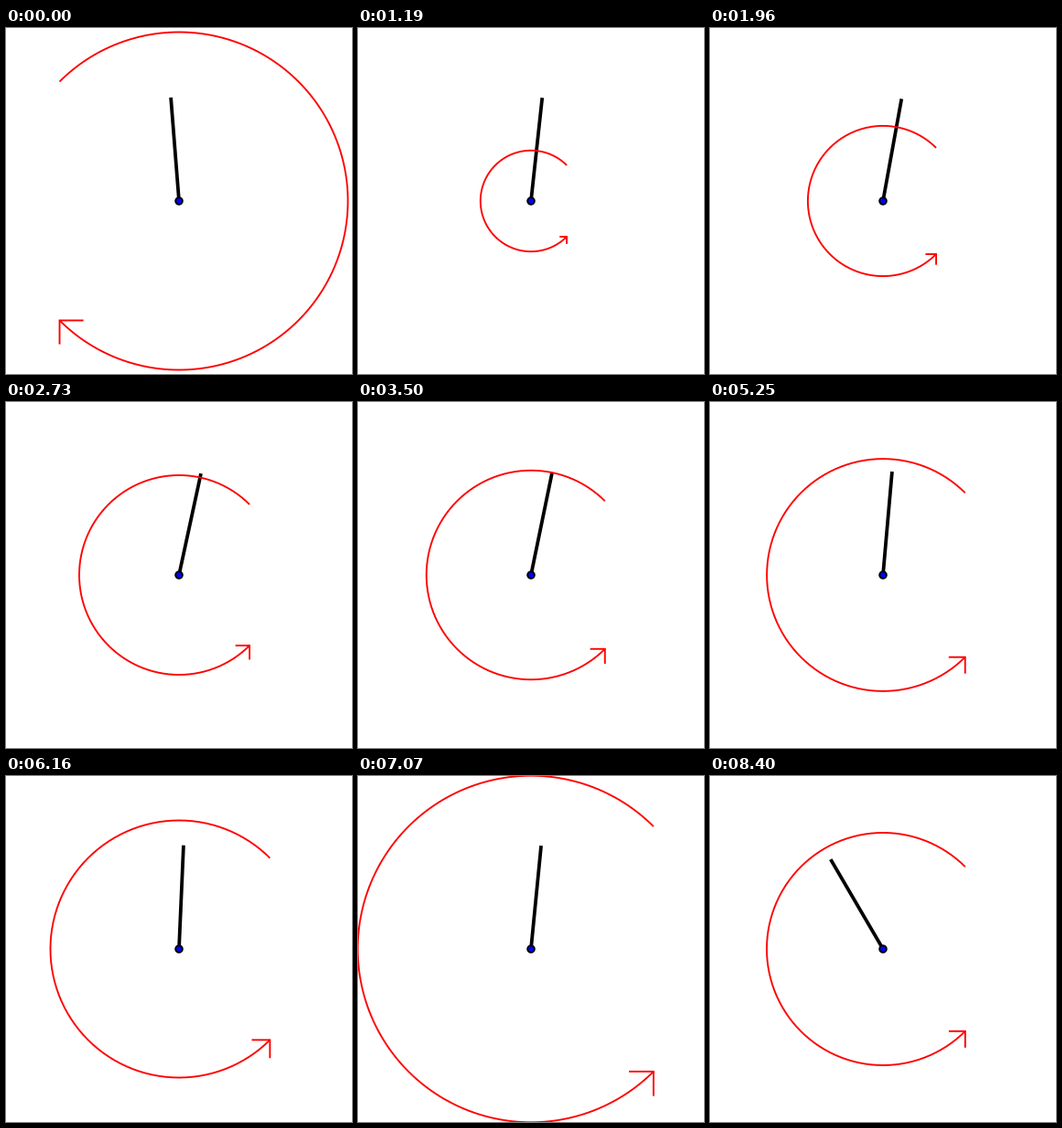
A matplotlib script for the animation above (8.47 s loop, 378 px wide and 378 px high).

```python
import numpy as np
import matplotlib.pyplot as plt
from matplotlib.animation import FuncAnimation
from matplotlib.patches import Circle

SIZE, DPI = 378, 100
MID = SIZE / 2
ROD = 0.3 * SIZE
FRAMES, STEP = 121, 70
PT = 72 / DPI  # points per pixel
THIN, THICK = 0.005 * SIZE, 0.01 * SIZE

# step, lean in degrees (right positive), torque (counterclockwise positive),
# height of the two torque swings before the next pose
POSES = [(0, -4.5, -184.5, 190), (17, 6.2, 55.2, 95), (39, 12.2, 109, -245),
         (61, 9.65, 119.5, -260), (88, 2.5, 140.5, -345),
         (101, 5.6, 189.3, -200), (120, -30.3, 127, 0)]
steps, leans, torques, swings = np.array(POSES, float).T


def pose(k):
    """Lean follows a smooth curve; torque swings twice between poses."""
    i = min(np.searchsorted(steps, k, "right") - 1, len(steps) - 2)
    span = steps[i + 1] - steps[i]
    s = (k - steps[i]) / span
    ease = s * s * (3 - 2 * s)
    slope = np.gradient(leans, steps) * span
    lean = (leans[i] + (leans[i + 1] - leans[i]) * ease
            + s * (1 - s) * ((1 - s) * slope[i] - s * slope[i + 1]))
    torque = np.interp(k, steps, torques) + swings[i] * np.sin(2 * np.pi * s) ** 2
    return np.radians(lean), torque


fig = plt.figure(figsize=(SIZE / DPI, SIZE / DPI), dpi=DPI, facecolor="white")
ax = fig.add_axes([0, 0, 1, 1])
ax.set(xlim=(0, SIZE), ylim=(SIZE, 0))
ax.axis("off")


def stroke(color, width, z):
    return ax.plot([], [], color=color, lw=width * PT, zorder=z, snap=False,
                   solid_capstyle="butt", solid_joinstyle="miter")[0]


rod = stroke("black", THICK, 1)
arc = stroke("red", THIN, 2)
head = stroke("red", THIN, 2)
ax.add_patch(Circle((MID, MID), 0.01 * SIZE, fc="blue", ec="black",
                    lw=THIN * PT, snap=False, zorder=3))

sweep = np.radians(np.linspace(45, 315, 181))


def draw(k):
    lean, u = pose(k)
    rod.set_data([MID, MID + ROD * np.sin(lean)], [MID, MID - ROD * np.cos(lean)])

    x = MID + u * np.cos(sweep)
    y = MID - abs(u) * np.sin(sweep)
    arc.set_data(x, y)
    tx, ty, barb = x[-1], y[-1], 0.1 * np.sqrt(2)
    head.set_data([tx - barb * u, tx, tx], [ty, ty, ty + barb * abs(u)])
    return rod, arc, head


anim = FuncAnimation(fig, draw, frames=FRAMES, interval=STEP,
                     repeat=True, repeat_delay=0, blit=False)
plt.show()
```
